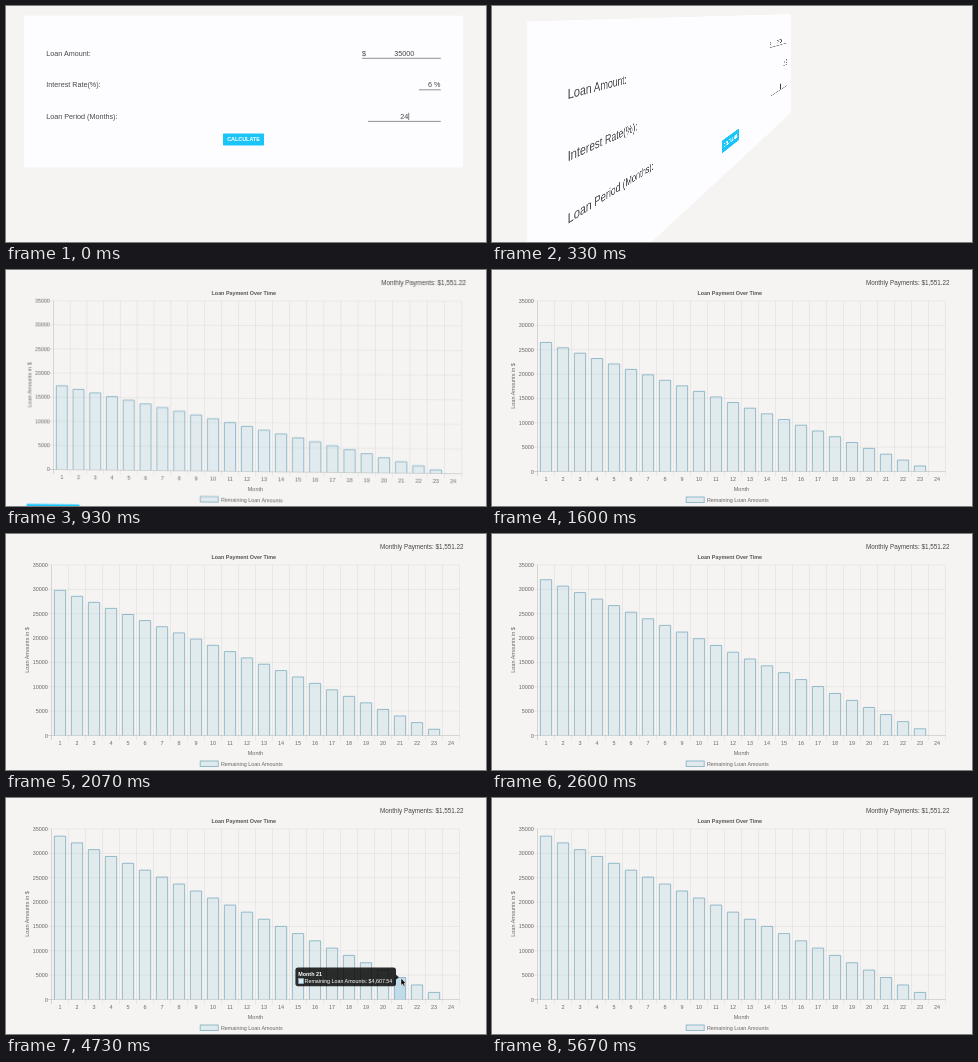
Write an HTML page that moves like this. It is 480 px wide and 236 px high and loops after 5870 ms.

```html
<!DOCTYPE html>
<html lang="en">
<head>
<meta charset="utf-8">
<title>Loan calculator</title>
<style>
html, body { margin: 0; width: 100%; height: 100%; overflow: hidden; background: #f5f4f2; }
#stage { position: relative; width: 480px; height: 236px; overflow: hidden; perspective: 368px; perspective-origin: 240px 5px; }
svg { position: absolute; left: 0; top: 0; overflow: visible; transform-origin: 240px 118px; }
text { font-family: "Liberation Sans", Arial, sans-serif; }
</style>
</head>
<body>
<div id="stage">
  <svg id="form" width="480" height="236"></svg>
  <svg id="chart" width="480" height="236"></svg>
  <svg id="top" width="480" height="236"></svg>
</div>
<script>
const LOOP = 5870, STEP = 1000 / 15;
const LEFT = 45.5, RIGHT = 453.5, BASE = 201.5, HEIGHT = 170.5, MAX = 35000;
const MONTHS = 24, COL = (RIGHT - LEFT) / MONTHS, BAR = 12.2;
const RATE = 0.005, PAYMENT = 1551.22;
const FILL = 'rgba(110,180,215,.14)', HOVER = 'rgba(110,180,215,.38)', EDGE = '#8ab4c6';
const BLUE = '#1bc5f8', INK = '#484848', GREY = '#666';

const form = document.getElementById('form');
const chart = document.getElementById('chart');
const overlay = document.getElementById('top');

function add(parent, tag, attrs, content) {
  const el = document.createElementNS('http://www.w3.org/2000/svg', tag);
  for (const k in attrs) el.setAttribute(k, attrs[k]);
  if (content !== undefined) el.textContent = content;
  parent.appendChild(el);
  return el;
}
function label(parent, x, y, content, size, fill, more) {
  return add(parent, 'text', { x, y, 'font-size': size, fill, ...more }, content);
}
function line(parent, x1, y1, x2, y2, stroke, width) {
  return add(parent, 'line', { x1, y1, x2, y2, stroke, 'stroke-width': width });
}
function rect(parent, x, y, width, height, fill, more) {
  return add(parent, 'rect', { x, y, width, height, fill, ...more });
}
const MID = { 'text-anchor': 'middle' }, END = { 'text-anchor': 'end' }, BOLD = { 'font-weight': 'bold' };

function button(parent, x, y, w, h, content) {
  rect(parent, x, y, w, h, BLUE, { rx: 0.8 });
  label(parent, x + w / 2, y + h / 2 + 1.95, content, 5.4, '#fff', { ...MID, ...BOLD });
}

function buildForm() {
  rect(form, 18, 9.7, 439, 151.8, '#fdfcfe');
  label(form, 40.3, 49.7, 'Loan Amount:', 7.2, INK);
  label(form, 40.3, 81.4, 'Interest Rate(%):', 7.2, INK);
  label(form, 40.3, 113, 'Loan Period (Months):', 7.2, INK);
  label(form, 356, 49.7, '$', 7.2, INK);
  label(form, 398.3, 49.7, '35000', 7.2, INK, MID);
  label(form, 434.3, 81.4, '6 %', 7.2, INK, END);
  label(form, 398.2, 113, '24', 7.2, INK, MID);
  [[356, 52.3], [413, 83.8], [362, 115.4]].forEach(([x, y]) => line(form, x, y, 434.8, y, '#858585', 0.9));
  line(form, 402.7, 106.8, 402.7, 114, '#333', 0.6);
  button(form, 217, 127.5, 41, 12, 'CALCULATE');
}

const bars = [];
function buildChart() {
  label(chart, 457.6, 15.2, 'Monthly Payments: $1,551.22', 6.32, INK, END);
  label(chart, 237.8, 25.2, 'Loan Payment Over Time', 5.4, '#555', { ...MID, ...BOLD });
  const grid = 'rgba(0,0,0,.1)';
  for (let i = 0; i <= 7; i++) {
    const y = BASE - i * HEIGHT / 7;
    line(chart, LEFT - 4.5, y, RIGHT, y, i ? grid : 'rgba(0,0,0,.25)', 0.5);
    label(chart, 41.8, y + 2, i * 5000, 5.45, GREY, END);
  }
  for (let i = 0; i <= MONTHS; i++) {
    const x = LEFT + i * COL;
    line(chart, x, BASE - HEIGHT, x, BASE + 4.5, i ? grid : 'rgba(0,0,0,.25)', 0.5);
    if (i < MONTHS) label(chart, x + COL / 2, 211, i + 1, 5.45, GREY, MID);
  }
  label(chart, 249.4, 221.2, 'Month', 5.5, GREY, MID);
  label(chart, 0, 0, 'Loan Amounts in $', 5.5, GREY, { ...MID, transform: 'translate(22.8 116) rotate(-90)' });
  rect(chart, 194.2, 227, 18, 5.5, FILL, { stroke: EDGE, 'stroke-width': 0.9 });
  label(chart, 214.9, 231.8, 'Remaining Loan Amounts', 5.42, GREY);
  button(chart, 18, 236.6, 54, 13, 'RETURN TO DATA');

  let left = MAX;
  for (let i = 0; i < MONTHS - 1; i++) {
    left = left * (1 + RATE) - PAYMENT;
    const el = add(chart, 'path', { fill: FILL, stroke: EDGE, 'stroke-width': 0.9 });
    bars.push({ el, x: LEFT + (i + 0.5) * COL - BAR / 2 + 0.45, h: left / MAX * HEIGHT });
  }
}

let tip, pointer;
function buildOverlay() {
  tip = add(overlay, 'g', {});
  rect(tip, 289.4, 169.6, 100.6, 18.6, 'rgba(0,0,0,.82)', { rx: 2.6 });
  add(tip, 'path', { d: 'M390 176.8 L393 179.2 L390 181.6Z', fill: 'rgba(0,0,0,.82)' });
  label(tip, 292.3, 177.6, 'Month 21', 5.4, '#fff', BOLD);
  rect(tip, 292.6, 180.6, 5, 5, '#dfe9ed', { stroke: EDGE, 'stroke-width': 0.6 });
  label(tip, 298.6, 185.4, 'Remaining Loan Amounts: $4,607.54', 5.33, '#fff');
  pointer = add(overlay, 'path', {
    d: 'M0 0V7.2L1.6 5.7L2.8 8.4L4 7.9L2.9 5.3H5Z',
    fill: '#000', stroke: '#fff', 'stroke-width': 0.5
  });
}

const clamp = v => Math.min(1, Math.max(0, v));
const ramp = (t, a, b) => clamp((t - a) / (b - a));

// cubic-bezier(.25, .1, .25, 1)
function ease(x) {
  const curve = (u, a, b) => 3 * u * (1 - u) * (1 - u) * a + 3 * u * u * (1 - u) * b + u * u * u;
  let lo = 0, hi = 1;
  for (let i = 0; i < 24; i++) {
    const m = (lo + hi) / 2;
    if (curve(m, 0.25, 0.25) < x) lo = m; else hi = m;
  }
  return x >= 1 ? 1 : curve(lo, 0.1, 1);
}

// time, x, y
const TRAIL = [
  [2740, 484, 152], [2990, 425, 177], [3250, 409, 190], [3560, 395, 180.2],
  [4860, 395, 180.2], [5120, 394.4, 180], [5260, 395, 181], [5560, 396, 240]
];
function pointerAt(t) {
  let i = 0;
  while (i < TRAIL.length - 2 && t > TRAIL[i + 1][0]) i++;
  const [a, b] = [TRAIL[i], TRAIL[i + 1]];
  const k = ramp(t, a[0], b[0]);
  return [a[1] + (b[1] - a[1]) * k, a[2] + (b[2] - a[2]) * k];
}

function draw(t) {
  const turn = 180 * ease(ramp(t, 60, 960));
  form.style.visibility = turn < 90 ? 'visible' : 'hidden';
  chart.style.visibility = turn >= 90 ? 'visible' : 'hidden';
  form.style.transform = turn ? `rotateY(${turn}deg)` : 'none';
  chart.style.transform = turn < 180 ? `rotateY(${turn - 180}deg)` : 'none';

  const grow = 1 - Math.pow(1 - ramp(t, 80, 4780), 4);
  const w = BAR - 0.9;
  bars.forEach(b => {
    const y = BASE - b.h * grow + 0.45;
    b.el.setAttribute('d', `M${b.x} ${BASE}V${y}h${w}V${BASE}`);
  });

  const shown = ramp(t, 3340, 3600) * (1 - ramp(t, 5340, 5640));
  tip.setAttribute('opacity', shown);
  bars[20].el.setAttribute('fill', t > 3340 && t < 5380 ? HOVER : FILL);

  const [x, y] = pointerAt(t);
  pointer.setAttribute('transform', `translate(${x} ${y})`);
  pointer.setAttribute('visibility', t > 2740 && t < 5560 ? 'visible' : 'hidden');
}

buildForm();
buildChart();
buildOverlay();
const start = performance.now();
function tick() {
  const t = (performance.now() - start) % LOOP;
  draw(Math.floor(t / STEP + 0.01) * STEP);
  requestAnimationFrame(tick);
}
draw(0);
requestAnimationFrame(tick);
</script>
</body>
</html>
```
